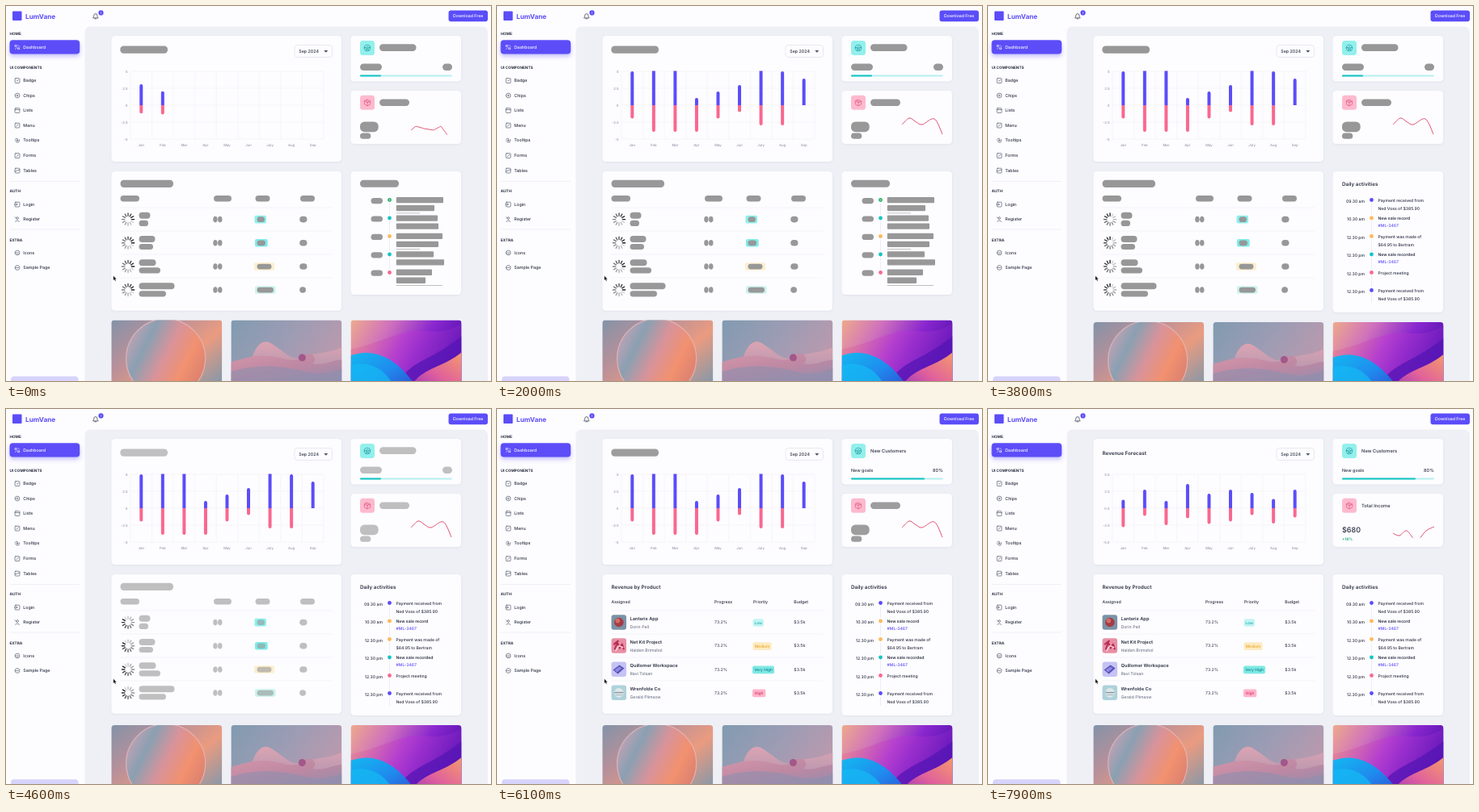
Animation, 600 px wide and 465 px high, one loop 8000 ms. Source, as an HTML page:

```html
<!DOCTYPE html>
<html lang="en">
<head>
<meta charset="utf-8">
<title>Dashboard loading</title>
<style>
html, body { margin: 0; width: 100%; height: 100%; overflow: hidden; background: #fdfcff; }
svg { display: block; }
text { font-family: Inter, Roboto, sans-serif; text-rendering: geometricPrecision; }
.pulse { fill: #979797; }
</style>
</head>
<body>
<svg id="stage" width="600" height="465" viewBox="0 0 600 465"></svg>
<script>
const LOOP = 8000, LOADS = [3300, 5400, 7000];
const BLUE = '#5b4df8', PINK = '#f8688f', TEAL = '#16c4c4', ORANGE = '#fdb95b', INK = '#2b3040', CARD = '#fdfcff';

// Markup helpers
const rect = (x, y, w, h, r, fill, more = '') =>
  `<rect x="${x}" y="${y}" width="${w}" height="${h}" rx="${r}" fill="${fill}" ${more}/>`;
const text = (x, y, s, size = 5.2, fill = INK, weight = 500, anchor = 'start') =>
  `<text x="${x}" y="${y + size * .36}" font-size="${size}" fill="${fill}" font-weight="${weight}" text-anchor="${anchor}">${s}</text>`;
const title = (x, y, s) => text(x, y, s, 6.3, INK, 600);
const line = (x1, y1, x2, y2, c = '#e6e8ef', w = .6) =>
  `<path d="M${x1} ${y1}L${x2} ${y2}" stroke="${c}" stroke-width="${w}"/>`;
const dot = (x, y, r, fill) => `<circle cx="${x}" cy="${y}" r="${r}" fill="${fill}"/>`;
const icon = (x, y, d, c = '#4c5364', w = .65) =>
  `<path transform="translate(${x} ${y})" d="${d}" fill="none" stroke="${c}" stroke-width="${w}" stroke-linecap="round" stroke-linejoin="round"/>`;
const pill = (x1, x2, y1, y2, r = 4.2) =>
  `<rect x="${x1}" y="${y1}" width="${x2 - x1}" height="${y2 - y1}" rx="${Math.min(r, (y2 - y1) / 2)}"/>`;
const pulse = s => `<g class="pulse">${s}</g>`;
const card = (x, y, w, h) => rect(x, y, w, h, 4.5, CARD, 'filter="url(#soft)"');
const gradient = (id, x1, y1, x2, y2, ...stops) =>
  `<linearGradient id="${id}" x1="${x1}" y1="${y1}" x2="${x2}" y2="${y2}">` +
  stops.map((c, i) => `<stop offset="${i / (stops.length - 1)}" stop-color="${c}"/>`).join('') + '</linearGradient>';

const defs = `<defs>
  <filter id="soft" x="-5%" y="-5%" width="110%" height="115%"><feDropShadow dx="0" dy=".6" stdDeviation=".9" flood-color="#5a6580" flood-opacity=".12"/></filter>
  <filter id="glow" x="-20%" y="-30%" width="140%" height="220%"><feDropShadow dx="0" dy="3" stdDeviation="2.4" flood-color="#5b4df8" flood-opacity=".35"/></filter>
  <clipPath id="photo"><rect width="137" height="90" rx="4"/></clipPath>
  <clipPath id="plot"><rect x="154" y="80.5" width="240" height="85"/></clipPath>
  <clipPath id="spark"><rect x="495" y="135" width="60" height="24.8"/></clipPath>
  ${gradient('g1', 0, 0, 1, .8, '#8393a8', '#b7909a', '#ea9b80', '#8c98a6')}
  ${gradient('g2', 0, .2, 1, .7, '#c8a3b5', '#8aa0b2', '#d8939a', '#f2916f', '#d97f70')}
  ${gradient('g3', 0, 0, 1, .5, '#819bb0', '#9c9cb4', '#bd99ad')}
  ${gradient('g4', 0, 0, .6, 1, '#d295a8', '#bd88a3', '#8d8eae')}
  ${gradient('g5', 0, 0, 0, 1, '#dba4b3', '#9a8dab')}
  ${gradient('g6', 0, 0, 1, .4, '#eeaa8c', '#cf70bd', '#8a27cf', '#5411ac')}
  ${gradient('g7', 0, 0, 1, .3, '#ee8f86', '#b73bd2', '#6d1bc0')}
  ${gradient('g8', 0, 0, 1, 1, '#13b8f0', '#1f8bee', '#3046cf')}
  ${gradient('g9', 0, 1, 1, 0, '#8a2bc8', '#e0609c', '#f49a6c')}
</defs>`;

// Sidebar and header
const BOX = 'M-2-2.8h4q.9 0 .9.9v4q0 .9-.9.9h-4q-.9 0-.9-.9v-4q0-.9.9-.9z';
const ROUND = 'M-2.9 0a2.9 2.9 0 1 0 5.8 0a2.9 2.9 0 1 0-5.8 0';
const items = [
  [92.5, 'Badge', BOX + 'M-1 0l.8.8l1.5-1.6'], [111, 'Chips', ROUND + 'M-1 0h2M0-1v2'],
  [129.5, 'Lists', BOX + 'M-2.9-1h5.8'], [148, 'Menu', BOX + 'M-1.2 1.4l2.6-2.6'],
  [166.5, 'Tooltips', 'M-2.8-1l1.8-1.6l1.6 1M2.6-.8l-.8 3.2h-2.8l-1.6-2M-1 0h2M0-1v2'],
  [185.5, 'Forms', BOX + 'M-1.2 1.4l2.6-2.6'], [204, 'Tables', BOX + 'M-2.9 1l5.8-2'],
  [246, 'Login', BOX + 'M-3.4 0h3.4M-1.2-1.2l1.2 1.2l-1.2 1.2'],
  [264.5, 'Register', 'M-1.4-1.4a1.4 1.4 0 1 0 2.8 0a1.4 1.4 0 1 0-2.8 0M-2.5 2.6q2-2.4 5 0M-2.8-2.8l1 1'],
  [306, 'Icons', ROUND + 'M-1-.6v.2M1-.6v.2M-1.2 1h2.4'], [324.5, 'Sample Page', ROUND + 'M-1.4 0h2.8']
];
const chrome =
  rect(97.5, 25.5, 498.5, 460, 7, '#eef0f6') +
  rect(8, 6.5, 11.5, 11.5, 1, BLUE) + text(24, 12.6, 'LumVane', 8.2, BLUE, 700) +
  icon(110.8, 12.6, 'M-3 2q1-1 1-3a2 2 0 0 1 4 0q0 2 1 3zM-.8 3.2h1.6', INK, .7) +
  dot(117.5, 8.4, 3.1, BLUE) + text(117.5, 8.4, '1', 3.6, '#fff', 600, 'middle') +
  rect(547.5, 5.5, 48.5, 13.7, 3, BLUE) + text(571.7, 12.3, 'Download Free', 5.2, '#fff', 500, 'middle') +
  [[34, 'HOME'], [76, 'UI COMPONENTS'], [229.5, 'AUTH'], [290, 'EXTRA']].map(([y, s]) => text(4.5, y, s, 4.7, INK, 700)).join('') +
  rect(4.5, 42.2, 86.7, 17.2, 4, BLUE, 'filter="url(#glow)"') +
  icon(14, 51, 'M-2.6-2.4h1.8v1.8h-1.8zM.8.8h1.8v1.8h-1.8zM1-2.4l1.6 1.6M-2.6 2.4l1.6-1.6', '#fff') +
  text(21.3, 51, 'Dashboard', 5.3, '#fff') +
  items.map(([y, s, d]) => icon(14, y, d) + text(21.3, y, s, 5.3)).join('') +
  line(4.5, 217.5, 91, 217.5) + line(4.5, 277, 91, 277) +
  rect(6, 459.3, 83.5, 14, 4, '#d7d3fb');

// Chart and small cards
const months = 'Jan Feb Mar Apr May Jun July Aug Sep'.split(' ');
const monthX = i => 154 + 26.55 * (i + .5);
const axis = labels => labels.map((s, i) => text(150.5, 81 + 21 * i, s, 4.3, '#83899a', 400, 'end')).join('');
const cards =
  card(130.5, 37, 284.5, 156) + card(426.5, 37, 136.5, 56.5) + card(426.5, 105, 136.5, 66) + card(130.5, 205, 284.5, 172.7) +
  rect(357, 48.5, 46.5, 15, 3.5, CARD, 'stroke="#dfe2ea" stroke-width=".7"') + text(362.3, 56, 'Sep 2024', 5.3) +
  '<path d="M393.3 55h5l-2.5 2.7z" fill="#4c5364"/>' +
  [0, 1, 2, 3, 4].map(i => line(154, 81 + 21 * i, 393, 81 + 21 * i, '#eef0f4')).join('') +
  Array.from({ length: 10 }, (_, i) => line(154 + 26.55 * i, 81, 154 + 26.55 * i, 165, '#f0f1f5')).join('') +
  months.map((m, i) => text(monthX(i), 172.3, m, 4.3, '#83899a', 400, 'middle')).join('') +
  `<g clip-path="url(#plot)"><path id="up" fill="${BLUE}"/><path id="down" fill="${PINK}"/></g>` +
  rect(438, 43, 18, 18, 3.5, '#92f0ec') + icon(447, 52, 'M-3.8 0a3.8 3.8 0 1 0 7.6 0a3.8 3.8 0 1 0-7.6 0M-1.4 0l.7-1.3h1.4l.7 1.3l-.7 1.3h-1.4zM-3.6-.8l2.2.8M1.4 0l2.2-.8M-.7 1.3l-.9 2M.7 1.3l.9 2', '#148f96') +
  rect(438, 110.8, 18, 18, 3.5, '#fdbace') + icon(447, 120, 'M0-3.8l3.6 1.8v4l-3.6 1.8l-3.6-1.8v-4zM-3.6-2l3.6 1.8l3.6-1.8M0-.2v4M-1.8-2.9l3.6 1.8', '#e0507c') +
  rect(438, 85.6, 113.7, 1.8, .9, '#b5f0ee') + `<rect id="goal" x="438" y="85.6" height="1.8" rx=".9" fill="${TEAL}"/>` +
  '<path id="trend" clip-path="url(#spark)" fill="none" stroke="#df5472" stroke-width="1"/>' +
  [250, 279, 308, 337].map(y => line(141.5, y, 404, y, '#eceef3')).join('');

// Activity card
const lineX = 474.5, stepY = [240.5, 263, 285.5, 308, 330.5, 352.5];
const dots = colors => colors.map((c, i) =>
  (i < colors.length - 1 ? line(lineX, stepY[i] + 4, lineX, stepY[i + 1] - 4, '#e1e4ec') : '') + dot(lineX, stepY[i], 2.4, c)).join('');
const bones = [[541, 530, 512], [534, 535, 0], [540, 535, 512], [529, 542, 0], [527, 519, 540]];
const activityWait = card(426.5, 205, 136.5, 153) + dots(['#12b878', TEAL, ORANGE, TEAL, PINK]) + dot(lineX, 240.5, 1, ORANGE) +
  pulse(pill(438, 486, 215.7, 224.7) + bones.map(([a, b, c], i) => {
    const y = 237 + 22.4 * i;
    return pill(451.5, 466, y + 1, y + 8.2) + pill(482.8, a, y, y + 7.3, 1) + pill(482.8, b, y + 10, y + 17.3, 1) +
      (c ? pill(482.8, c, y + 19.6, y + 20.2, 0) : '');
  }).join(''));
const paid = ['Payment received from', 'Ned Voss of $385.90'];
const activities = [['09.30 am', ...paid], ['10.30 am', 'New sale record', '#ML-3467'],
  ['12.30 pm', 'Payment was made of', '$64.95 to Bertram'], ['12.30 pm', 'New sale recorded', '#ML-3467'],
  ['12.30 pm', 'Project meeting', ''], ['12.30 pm', ...paid]];
const activityDone = card(426.5, 205, 136.5, 175) + title(438, 220.3, 'Daily activities') +
  dots([BLUE, ORANGE, ORANGE, TEAL, PINK, BLUE]) + line(lineX, 357, lineX, 368, '#e1e4ec') +
  activities.map(([time, a, b], i) => {
    const sale = b[0] == '#', y = stepY[i] + (sale ? .6 : .2);
    return text(466, stepY[i] + 1.3, time, 5.1, INK, 500, 'end') + text(482.5, y, a, 5.1, INK, sale ? 600 : 500) +
      text(482.5, y + (sale ? 8.6 : 10), b, 5.1, sale ? BLUE : INK);
  }).join('');

// Table and customers
const rowY = [264.6, 293.7, 323, 352];
const chip = (x1, x2, y, fill) => rect(x1, y - 4.8, x2 - x1, 9.6, 2, fill);
const spinner = y => `<g transform="translate(151 ${y})"><g class="spin">` + Array.from({ length: 12 }, (_, i) =>
  `<path d="M0-4.3V-7.6" transform="rotate(${30 * i})" stroke="#222" stroke-opacity="${.2 + .8 * i / 11}" stroke-width="1.4" stroke-linecap="round"/>`).join('') + '</g></g>';
const tableWait =
  [[307.5, 322, '#8ef0ec'], [308, 323.7, '#7deceb'], [307, 332, '#fcefcf'], [308, 333.5, '#cbf3ec']].map(([a, b, c], i) => chip(a, b, rowY[i], c)).join('') +
  rowY.map(spinner).join('') +
  pulse(pill(462, 507.5, 47.3, 56) + pill(438, 465, 71.5, 80) + pill(540, 552, 71.5, 80) +
    pill(141.5, 207, 215.7, 225) + [[141.5, 165], [257, 279], [308.5, 326.5], [364, 382]].map(([a, b]) => pill(a, b, 235, 242.4)).join('') +
    [[178.5, 176, 320], [184.5, 182, 321], [185.5, 191, 328.5], [208.5, 198, 331]].map(([a, b, c], i) => {
      const y = rowY[i];
      return pill(164.5, a, y - 8.8, y - .8) + pill(164.5, b, y + 1.2, y + 8.4) + pill(256.2, 261.6, y - 3.8, y + 3.8) +
        pill(262, 267.5, y - 3.8, y + 3.8) + pill(310.5, c, y - 3.3, y + 3.5) + pill(363.2, i < 3 ? 372.5 : 371, y - 3.8, y + 3.8);
    }).join(''));
const avatars = [
  rect(0, 0, 18.5, 18.5, 3, '#7b92a6') + dot(9.3, 9.3, 5.8, '#a63b45') + dot(7.8, 7.4, 2.8, '#cf7069'),
  rect(0, 0, 18.5, 18.5, 3, '#e790a5') + icon(9.3, 9.3, 'M-5 4l3-8l3 7l3-5l2 6M-6-2l5-4', '#b92d55', 2) + icon(9.3, 9.3, 'M-4 6l4-6l5 2', '#fde0e6', 1.2),
  rect(0, 0, 18.5, 18.5, 3, '#c5c3f4') + '<path d="M2 10l8-6l6 4l-8 7z" fill="#5850b8"/><path d="M4 10l6-4l3 2l-6 5z" fill="#8f8ce0"/>',
  rect(0, 0, 18.5, 18.5, 3, '#add2da') + dot(9.3, 9.3, 5.8, '#dfe7e9') + line(3.8, 9, 14.8, 9, '#85979f', 1.4) + line(5, 12, 13.6, 12, '#a4b6bc', 1)
];
const rows = [
  ['Lanterix App', 'Dorin Pell', 'Low', 316.5, 330, '#c3f5f3', '#19a9b2'],
  ['Net Kit Project', 'Halden Brimshol', 'Medium', 316.5, 339.5, '#fdebc0', '#eba42f'],
  ['Quillomer Workspace', 'Ravi Tolsan', 'Very High', 316, 343, '#7ee9e4', '#0e7f86'],
  ['Wrenfolde Co', 'Gerald Plimsow', 'High', 316, 332.3, '#ffb3ca', '#d83266']
];
const tableDone = text(462, 51.7, 'New Customers', 5.8) + text(438, 75.6, 'New goals', 5.4) + text(551.7, 75.6, '80%', 5.6, INK, 500, 'end') +
  title(141.5, 220.3, 'Revenue by Product') +
  [[141.5, 'Assigned'], [269, 'Progress'], [317, 'Priority'], [367.3, 'Budget']].map(([x, s]) => text(x, 239, s)).join('') +
  rows.map(([name, owner, level, x1, x2, fill, ink], i) => {
    const y = rowY[i];
    return `<g transform="translate(141.5 ${y - 9.4})">${avatars[i]}</g>` +
      text(164.5, y - 4.6, name, 5.7, INK, 600) + text(164.5, y + 5.3, owner, 5.2, '#5c6375', 400) +
      text(269, y - .3, '73.2%', 5.2, '#4c5364') + chip(x1, x2, y + .4, fill) +
      text((x1 + x2) / 2, y + .4, level, 4.8, ink, 500, 'middle') + text(367.3, y - .3, '$3.5k', 5.2, '#3b4152');
  }).join('');

// Forecast and income
const incomeWait = axis([5, 2.5, 0, -2.5, -5]) + pulse(pill(141.3, 200, 49.5, 58.7) +
  pill(462, 499, 115.5, 124) + pill(438, 460.7, 143.5, 156.2, 5.5) + pill(438, 451.3, 157.6, 164.8));
const incomeDone = axis(['5.0', '2.5', '0.0', '-2.5', '-5.0']) + title(141.5, 54.3, 'Revenue Forecast') +
  text(462, 120, 'Total Income', 5.8) + text(438, 150, '$680', 9, INK, 500) + text(438, 161.2, '+18%', 4.8, '#1fae7c', 600);

// Pictures at the bottom
const photos = [
  rect(0, 0, 137, 90, 0, 'url(#g1)') + `<circle cx="67.3" cy="47.5" r="49" fill="url(#g2)" stroke="#e6b9bd" stroke-opacity=".8" stroke-width="1.2"/>`,
  rect(0, 0, 137, 90, 0, 'url(#g3)') +
    '<path d="M20 90C20 50 32 20 48 28C66 38 74 52 90 46C104 40 118 42 137 34V90z" fill="url(#g5)"/>' +
    '<path d="M0 52C20 46 34 42 52 45C70 48 80 54 92 43C101 38 108 48 101 54C112 57 124 50 137 49V90H0z" fill="url(#g4)"/>' +
    dot(88, 46.5, 4.5, '#a3578a') + '<path d="M0 64C30 54 64 56 92 64C112 69 126 64 137 60V90H0z" fill="#8e8fb0" opacity=".6"/>',
  rect(0, 0, 137, 90, 0, 'url(#g6)') +
    '<path d="M0 36C30 30 46 20 72 14C92 10 110 22 137 4V90H0z" fill="url(#g7)" opacity=".75"/>' +
    '<path d="M52 90C70 48 92 56 137 20V90z" fill="#5414b4" opacity=".75"/>' +
    '<path d="M70 90C84 58 110 62 137 40V90z" fill="url(#g9)"/>' +
    '<path d="M0 44C26 34 56 44 82 84V90H0z" fill="url(#g8)"/>' +
    '<path d="M0 56C24 50 44 60 58 90H0z" fill="#14b9f3" opacity=".75"/>'
];
const pictures = '<g id="photos">' + photos.map((s, i) =>
  `<g transform="translate(${130.3 + 148.1 * i} 389.5)" clip-path="url(#photo)">${s}</g>`).join('') + '</g>';

const stages = [[activityWait, activityDone], [tableWait, tableDone], [incomeWait, incomeDone]];
const $ = id => document.getElementById(id);
$('stage').innerHTML = defs + chrome + cards +
  stages.map(([a, b], i) => `<g id="wait${i}">${a}</g><g id="done${i}">${b}</g>`).join('') + pictures +
  '<path d="M132.8 334.6v5.6l1.3-1.1l1 2.1l.9-.4l-.9-2h1.7z" fill="#000" stroke="#fff" stroke-width=".3"/>';

// Motion
const clamp = x => Math.min(1, Math.max(0, x));
const easeOut = x => 1 - (1 - clamp(x)) ** 2;
const smooth = x => x * x * (3 - 2 * x);
const mix = (a, b, k) => a + (b - a) * k;

const ups = [[42, 50, 50, 9, 17, 25, 50, 42, 33], [10.5, 23, 9, 30, 18, 23, 19, 11.5, 23]];
const downs = [[16.5, 33, 33, 33, 16.5, 8.5, 25, 25, 0], [23.5, 9.5, 21, 12.5, 19.5, 16.5, 8.5, 19, 11.5]];
const trends = [
  [[501, 154], [507, 149], [517, 152], [529, 154], [538, 149], [546, 160]],
  [[501, 147], [510, 139], [518, 143.5], [526, 147], [541, 140], [551, 159]],
  [[501, 154], [509, 157], [518, 151], [530, 163], [542, 151], [552, 146]]
];

function bars([before, after], sign, t) {
  const change = easeOut((t - LOADS[2]) / 600);
  return before.map((h, i) => {
    h = mix(h * easeOut((t + 190 - 95 * i) / 500), after[i], change);
    if (h < .2) return '';
    const r = Math.min(2, h);
    return `M${monthX(i) - 2} 123v${-sign * (h - r)}a2 ${r} 0 0 ${sign > 0 ? 1 : 0} 4 0V123z`;
  }).join('');
}

function curve(p, bend) {
  const at = i => p[Math.min(p.length - 1, Math.max(0, i))];
  const handle = (i, s) => [0, 1].map(k => at(i)[k] + s * bend * (at(i + 1)[k] - at(i - 1)[k]) / 6);
  return 'M' + p[0] + p.slice(1).map((q, i) => `C${handle(i, 1)} ${handle(i + 1, -1)} ${q}`).join('');
}

function trend(t) {
  const first = easeOut(t / 500), second = easeOut((t - LOADS[2]) / 600);
  const points = trends[1].map((p, i) => p.map((v, k) => mix(mix(trends[0][i][k], v, first), trends[2][i][k], second)));
  return curve(points, first);
}

function draw(t) {
  LOADS.forEach((at, i) => {
    $('wait' + i).style.display = t < at ? '' : 'none';
    $('done' + i).style.display = t < at ? 'none' : '';
  });
  const phase = (t / 2000 + .06) % 1;
  const fade = 1 - .5 * smooth(1 - Math.abs(2 * phase - 1));
  document.querySelectorAll('.pulse').forEach(g => g.setAttribute('opacity', fade));
  const turn = Math.floor(t / 1000 * 12) * 30 + 120;
  document.querySelectorAll('.spin').forEach(g => g.setAttribute('transform', `rotate(${turn})`));
  $('up').setAttribute('d', bars(ups, 1, t));
  $('down').setAttribute('d', bars(downs, -1, t));
  $('trend').setAttribute('d', trend(t));
  $('goal').setAttribute('width', mix(26, 91, easeOut((t - LOADS[1]) / 400)));
  $('photos').setAttribute('transform', `translate(0 ${t < LOADS[0] ? 0 : 2.5})`);
}

const start = performance.now();
function tick() {
  draw((performance.now() - start) % LOOP);
  requestAnimationFrame(tick);
}
tick();
</script>
</body>
</html>
```
